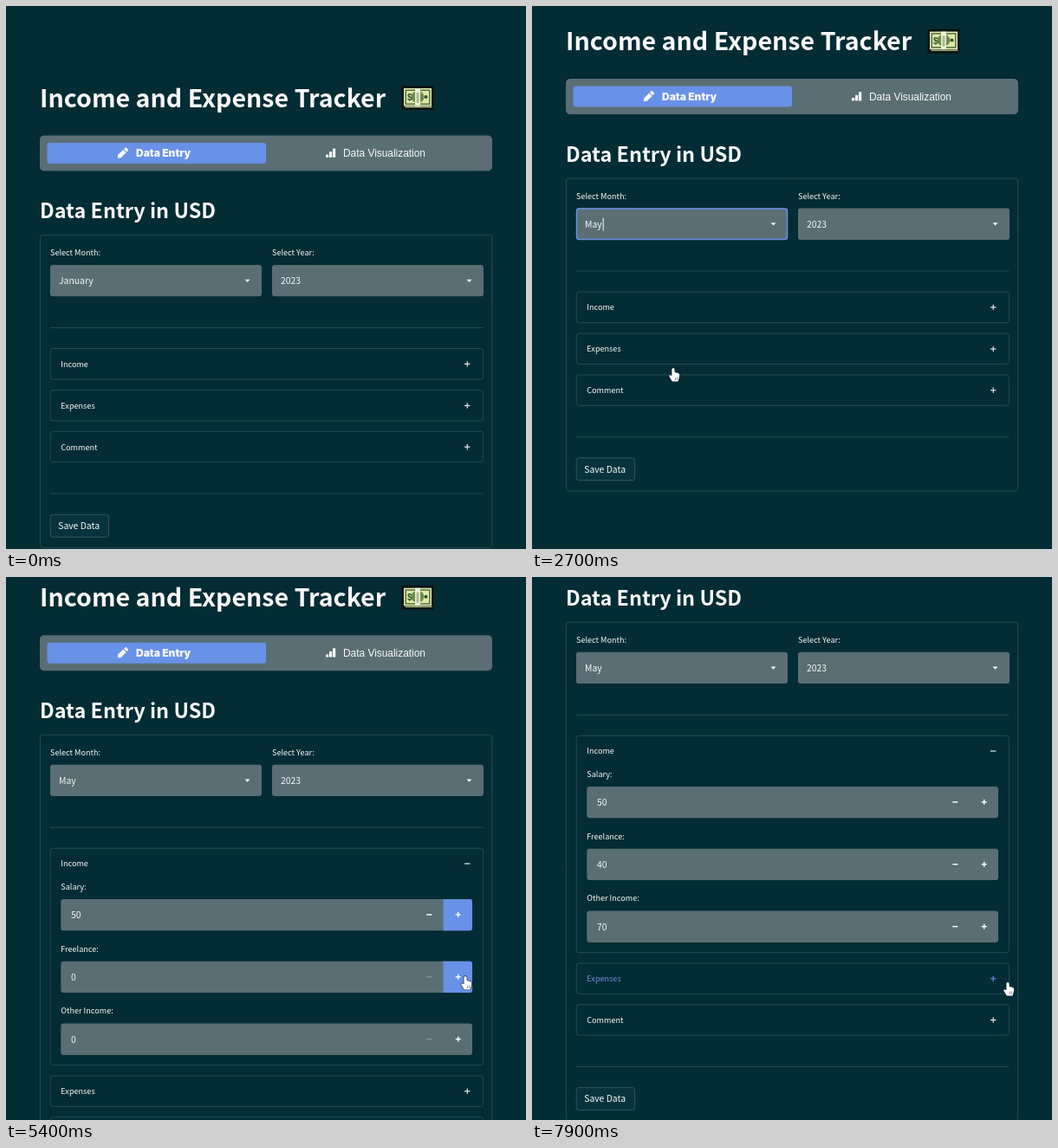
Recreate the animation shown at these times as an HTML page with a canvas. Size 600 by 627 pixels, loop 8000 ms.

```html
<!DOCTYPE html>
<html lang="en">
<head>
<meta charset="utf-8">
<title>Income and Expense Tracker</title>
<style>
html, body { margin: 0; width: 100%; height: 100%; overflow: hidden; background: #032c34; }
canvas { display: block; }
</style>
</head>
<body>
<canvas id="stage" width="600" height="627"></canvas>
<script>
const ctx = document.getElementById('stage').getContext('2d');
const LOOP = 8000;
const BG = '#032c34', FIELD = '#5a6e73', BLUE = '#6891e8', LINE = '#234c53', INK = '#fafafa', DIM = '#82949a';
const SANS = '"Noto Sans CJK JP", "Noto Sans CJK SC", "Open Sans", sans-serif';
const ARIAL = '"Liberation Sans", Arial, sans-serif';
const MONTHS = ['January', 'February', 'March', 'April', 'May', 'June', 'July', 'August'];

// Eased value through [time, value] keys.
function track(t, keys) {
  if (t <= keys[0][0]) return keys[0][1];
  for (let i = 1; i < keys.length; i++) {
    const [t1, b] = keys[i], [t0, a] = keys[i - 1];
    if (t < t1) {
      const k = (t - t0) / (t1 - t0);
      return a + (b - a) * k * k * (3 - 2 * k);
    }
  }
  return keys[keys.length - 1][1];
}
const during = (t, a, b) => t >= a && t < b;
const count = (t, start, step, max) => Math.max(0, Math.min(max, Math.floor((t - start) / step) + 1)) * 10;

const SCROLL = [[980, 0], [1090, 65.4], [3800, 65.4], [4100, 80.3], [4250, 82.3], [7450, 82.3], [7750, 212.3]];
const OPEN = [[3800, 0], [4080, 213], [4250, 214.7]];
const PATH = [
  [1750, -14, 300], [1880, 14, 290], [2060, 170, 256], [2180, 170, 256], [2450, 163, 418],
  [2750, 163, 418], [3200, 300, 350], [3750, 310, 347], [4100, 317, 345], [4500, 521, 385],
  [5150, 522, 385], [5350, 530, 461], [5950, 530, 461], [6200, 524, 530], [7250, 524, 530],
  [7550, 535, 490], [7850, 549, 468]
];

function text(s, x, y, size, color = INK, weight = 400, family = SANS) {
  ctx.font = `${weight} ${size}px ${family}`;
  ctx.fillStyle = color;
  ctx.fillText(s, x, y);
  return ctx.measureText(s).width;
}
function box(x, y, w, h, r, fill, stroke, lw = 1) {
  ctx.beginPath();
  ctx.roundRect(x, y, w, h, r);
  if (fill) { ctx.fillStyle = fill; ctx.fill(); }
  if (stroke) { ctx.strokeStyle = stroke; ctx.lineWidth = lw; ctx.stroke(); }
}
function rect(x, y, w, h, color) {
  ctx.fillStyle = color;
  ctx.fillRect(x, y, w, h);
}
function sign(x, y, plus, color, size = 6.4, lw = 1.1) {
  rect(x - size / 2, y - lw / 2, size, lw, color);
  if (plus) rect(x - lw / 2, y - size / 2, lw, size, color);
}
function poly(points, fill) {
  ctx.beginPath();
  points.forEach(([x, y]) => ctx.lineTo(x, y));
  ctx.closePath();
  ctx.fillStyle = fill;
  ctx.fill();
}

function banknote(x, y) {
  rect(x, y, 37, 28, '#0c1512');
  rect(x + 2.5, y + 3, 32, 20.5, '#e6edb4');
  rect(x + 4, y + 4.5, 29, 17.5, '#4d6f3e');
  rect(x + 5.5, y + 6, 26, 14.5, '#dfe8a6');
  ctx.fillStyle = '#6d8d50';
  ctx.beginPath();
  ctx.ellipse(x + 18.5, y + 13, 7.5, 7, 0, 0, 7);
  ctx.fill();
  rect(x + 15.5, y + 3, 6, 20.5, '#eef0d8');
  rect(x + 17, y + 8, 3, 12, '#a9b996');
  text('$', x + 6.5, y + 17, 10, '#2c5130', 700, ARIAL);
  ctx.fillStyle = '#2c5130';
  ctx.beginPath();
  ctx.arc(x + 28, y + 13, 2, 0, 7);
  ctx.fill();
  rect(x + 4, y + 24, 31, 1.2, '#c9d79a');
}

function pencil(x, y) {
  ctx.save();
  ctx.translate(x, y);
  ctx.rotate(-Math.PI / 4);
  poly([[-8, 0], [-5, -2.4], [3.4, -2.4], [3.4, 2.4], [-5, 2.4]], INK);
  box(4.4, -2.4, 3.2, 4.8, 1, INK);
  ctx.restore();
}

function header() {
  text('Income and Expense Tracker', 39, 116.5, 28.6, INK, 700);
  banknote(456.5, 92);
  box(39, 149.5, 522, 41, 5, FIELD);
  box(47.5, 158, 252.5, 24, 3, BLUE);
  pencil(134.5, 170);
  text('Data Entry', 150, 174.3, 12, INK, 900, 'Inter, sans-serif');
  [3.2, 6.6, 10.2].forEach((h, i) => rect(369 + i * 4, 174.8 - h, 3.2, h, INK));
  text('Data Visualization', 389, 174, 11.9, INK, 400, ARIAL);
  text('Data Entry in USD', 39, 245, 23.4, INK, 700);
}

function select(x, label, value, focus, caret) {
  text(label, x, 288, 9.1);
  box(x, 299, 244, 36.3, 3, FIELD);
  if (focus) box(x + .5, 299.5, 243, 35.3, 3, null, BLUE, 1.5);
  const w = text(value, x + 10, 321.3, 10.4);
  if (caret) rect(x + 11 + w, 310, 1, 15, INK);
  poly([[x + 224.5, 315.7], [x + 230.5, 315.7], [x + 227.5, 319]], INK);
}

function expander(label, y, h, hot, open) {
  box(51.2, y, 499.4, h, 3, null, LINE);
  const color = hot ? BLUE : INK;
  text(label, 63.3, y + 21.2, 9.1, color);
  sign(532.2, y + 17.8, !open, color);
}

function stepper(label, y, value, hot) {
  text(label, 63.3, y + 3.5, 9.1);
  box(63.3, y + 14.7, 474.7, 36.3, 3, FIELD);
  if (hot) box(504.5, y + 14.7, 33.5, 36.3, [0, 3, 3, 0], BLUE);
  text(String(value), 75, y + 36.8, 10.4);
  sign(488.3, y + 32.7, false, value ? INK : DIM, 6, 1.5);
  sign(521.7, y + 32.7, true, INK, 6, 1.5);
}

function menu(t) {
  box(51, 339, 244, 224, 3, BG, LINE);
  const hover = during(t, 2200, 2650) ? Math.round(track(t, [[2200, 0], [2450, 4]])) : 0;
  MONTHS.slice(0, 7).forEach((m, i) => {
    const y = 345 + i * 30;
    if (i === hover) rect(51.5, y, 243, 30, '#34505a');
    text(m, 61, y + 19, 10.4);
  });
}

function hand(x, y) {
  ctx.save();
  ctx.translate(x, y);
  ctx.beginPath();
  ctx.moveTo(-1.6, 1);
  ctx.quadraticCurveTo(0, -1.2, 1.5, 1);
  ctx.lineTo(1.7, 5);
  ctx.lineTo(6, 6);
  ctx.quadraticCurveTo(7.4, 6.5, 7.2, 9);
  ctx.lineTo(5.6, 15.5);
  ctx.lineTo(-1.2, 15.5);
  ctx.lineTo(-4.8, 9.4);
  ctx.quadraticCurveTo(-4.6, 7.2, -1.6, 9);
  ctx.closePath();
  ctx.lineWidth = 1.2;
  ctx.strokeStyle = '#0a1c22';
  ctx.stroke();
  ctx.fillStyle = '#fff';
  ctx.fill();
  rect(2.2, 10.5, .7, 3.5, '#667');
  rect(4.2, 10.5, .7, 3.5, '#667');
  ctx.restore();
}

function draw(t) {
  const open = track(t, OPEN), top = 395.5;
  rect(0, 0, 600, 627, BG);
  ctx.save();
  ctx.translate(0, -track(t, SCROLL));
  header();

  box(39.4, 264.6, 521.3, 360.8 + open, 3, null, LINE);
  const focus = during(t, 2100, 3800);
  const month = t < 2600 ? 'January' : 'May';
  select(51, 'Select Month:', month, focus, focus && (t - 2600 + 1000) % 1000 < 500);
  select(307, 'Select Year:', '2023');
  rect(51, 371, 499.5, 1, LINE);

  expander('Income', top, 35.7 + open, during(t, 3150, 4250), open > 0);
  if (open > 0) {
    ctx.save();
    ctx.beginPath();
    ctx.rect(52, top, 498, 35 + open);
    ctx.clip();
    stepper('Salary:', 439.5, count(t, 4600, 120, 5), during(t, 4480, 5500));
    stepper('Freelance:', 511.3, count(t, 5500, 130, 4), during(t, 5330, 6100));
    stepper('Other Income:', 583.2, count(t, 6300, 130, 7), during(t, 6150, 7520));
    ctx.restore();
  }
  expander('Expenses', 443.6 + open, 35.4, t >= 7750);
  expander('Comment', 491.3 + open, 35.4);
  rect(51, 562.5 + open, 499.5, 1, LINE);
  box(51.2, 587.2 + open, 67.4, 26, 3, '#07343c', '#2f575e');
  text('Save Data', 60.2, 604 + open, 10.4);
  if (during(t, 2100, 2600)) menu(t);
  ctx.restore();

  if (during(t, 1750, 7250) || t >= 7600) {
    hand(track(t, PATH.map(p => [p[0], p[1]])), track(t, PATH.map(p => [p[0], p[2]])));
  }
}

function frame(now) {
  draw(now % LOOP);
  requestAnimationFrame(frame);
}
requestAnimationFrame(frame);
</script>
</body>
</html>
```
